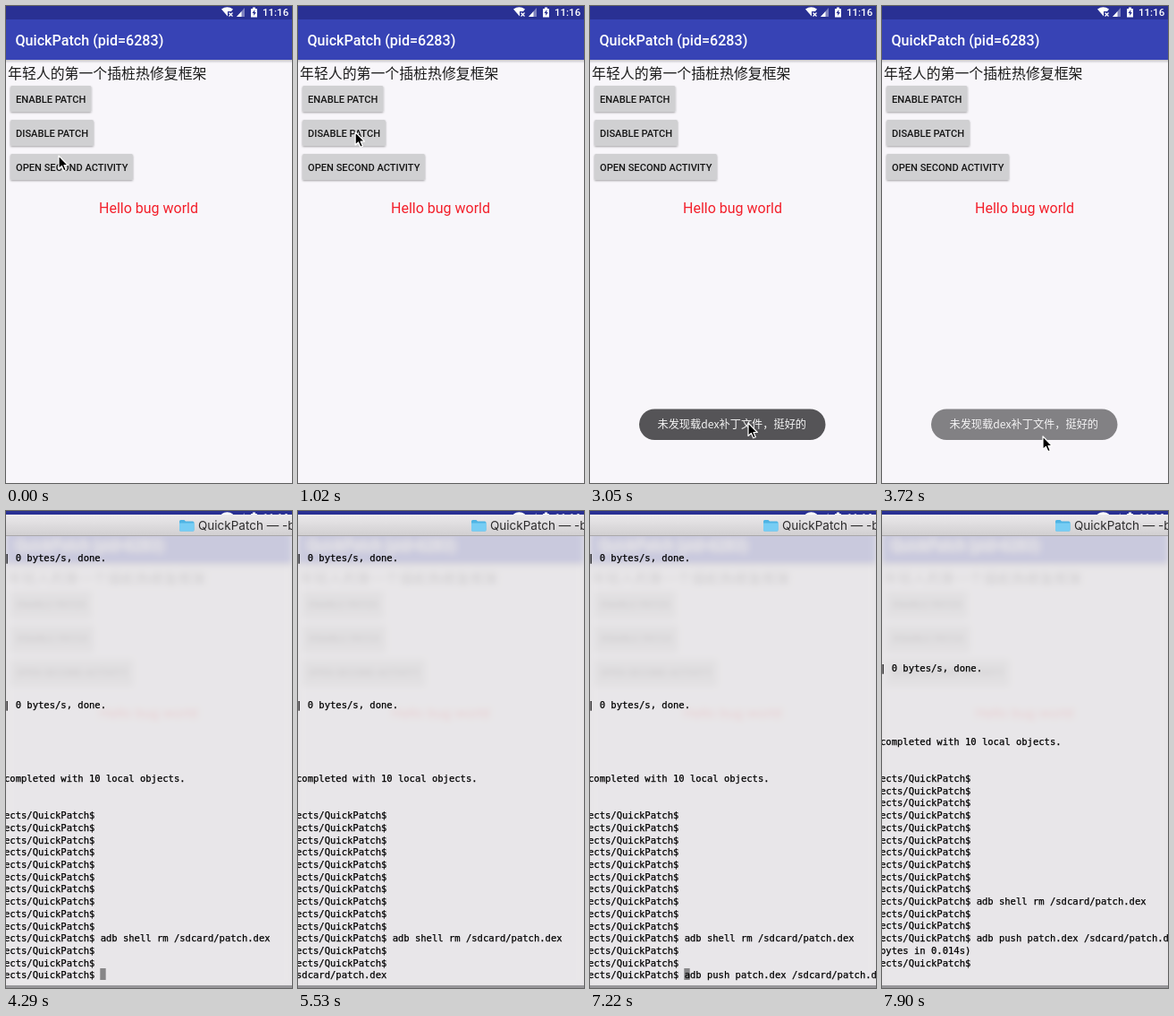
An HTML page for the animation above (8000 ms loop, 320 by 532 pixels).

```html
<!DOCTYPE html>
<html lang="zh-CN">
<head>
<meta charset="utf-8">
<title>QuickPatch</title>
<style>
html, body { margin: 0; width: 100%; height: 100%; overflow: hidden; background: #f8f6fa; }
svg { display: block; width: 320px; height: 532px; }
text { white-space: pre; }
.ui { font-family: Roboto, "Noto Sans", sans-serif; }
.cjk { font-family: "Noto Sans CJK SC", "Noto Sans CJK", sans-serif; }
.label { font-size: 11.1px; font-weight: 500; fill: #151515; }
.term { font: 10.53px "DejaVu Sans Mono", monospace; fill: #000; }
.term text { stroke: #000; stroke-width: .25px; }
</style>
</head>
<body>
<svg viewBox="0 0 320 532">
  <defs>
    <filter id="blur"><feGaussianBlur stdDeviation="3.7"/></filter>
    <filter id="shade" x="-10%" y="-20%" width="120%" height="150%">
      <feDropShadow dx="0" dy="1" stdDeviation=".8" flood-opacity=".35"/>
    </filter>
    <linearGradient id="bar" x2="0" y2="1">
      <stop stop-color="#ebe9eb"/><stop offset="1" stop-color="#d0ced0"/>
    </linearGradient>
    <linearGradient id="drop" x2="0" y2="1">
      <stop stop-color="#000" stop-opacity=".2"/><stop offset="1" stop-opacity="0"/>
    </linearGradient>
    <clipPath id="pane"><rect y="28" width="320" height="500"/></clipPath>
  </defs>

  <g id="app" class="ui">
    <rect width="320" height="532" fill="#f8f6fa"/>
    <rect y="60" width="320" height="4" fill="url(#drop)"/>
    <rect width="320" height="60" fill="#3743b5"/>
    <rect width="320" height="15" fill="#293093"/>
    <g fill="#fff">
      <path d="M241 3.5Q247.500 -1 254 3.500L252 6H248V11.500Z"/>
      <path d="M249.500 7.500l4 4m0-4l-4 4" stroke="#fff" stroke-width="1.200"/>
      <path d="M258 12L267 2V12Z" opacity=".4"/>
      <path d="M258 12L263.500 6V12Z"/>
      <path d="M274 3h2v-1.500h3V3h2v9.500h-7Z"/>
      <path d="M278.300 4l-2.800 4h1.700v3l2.600-4h-1.500Z" fill="#293093"/>
      <text x="287" y="11.200" font-size="11.500" font-weight="500">11:16</text>
      <text x="10.500" y="44" font-size="16.100" font-weight="500">QuickPatch (pid=6283)</text>
    </g>
    <text class="cjk" x="2" y="80.500" font-size="15.900" fill="#1c1c1c">年轻人的第一个插桩热修复框架</text>
    <g fill="#d0d0d2" filter="url(#shade)">
      <rect id="enable" x="5" y="89" width="90.500" height="29" rx="1.500"/>
      <rect x="5" y="127" width="93" height="29" rx="1.500"/>
      <rect x="5" y="165" width="137" height="29" rx="1.500"/>
    </g>
    <text class="label" x="11" y="108">ENABLE PATCH</text>
    <text class="label" x="11" y="146">DISABLE PATCH</text>
    <text class="label" x="11" y="183.500">OPEN SECOND ACTIVITY</text>
    <text x="159.500" y="231" font-size="16" fill="#f3202b" text-anchor="middle">Hello bug world</text>
    <g id="toast">
      <rect x="55" y="449.500" width="208.500" height="34.500" rx="17.250" fill="#555457"/>
      <text class="cjk" x="75.500" y="471" font-size="12.200" fill="#f4f4f4">未发现载dex补丁文件，挺好的</text>
    </g>
  </g>

  <path id="mouse" d="M0 0V14.500L3.400 11.400L5.700 16.800L8.300 15.700L6 10.500H10.300Z" stroke="#fff" stroke-width="1.200" stroke-linejoin="round"/>

  <g id="terminal">
    <rect y="4" width="320" height="528" fill="#e6e4e6"/>
    <g clip-path="url(#pane)">
      <use href="#app" filter="url(#blur)" opacity=".16"/>
      <rect id="bell" y="28" width="320" height="500" opacity=".1"/>
    </g>
    <g id="lines" class="term">
      <rect id="block" x="105.300" width="6.350" height="13" fill="#868587"/>
    </g>
    <rect y="529" width="320" height="3" fill="#98979a"/>
    <rect y="4" width="320" height="24" fill="url(#bar)"/>
    <rect y="27" width="320" height="1" fill="#a9a7a9"/>
    <path d="M194 11.500q0-1.500 1.500-1.500h4l1.500 1.500h8q1.500 0 1.500 1.500v8q0 1.500-1.500 1.500h-13.500q-1.500 0-1.500-1.500Z" fill="#4fb4e4"/>
    <path d="M194 13.500h16.500v7.500q0 1.500-1.500 1.500h-13.500q-1.500 0-1.500-1.500Z" fill="#77cdf4"/>
    <text x="215" y="21.300" font-family="Inter, Roboto, sans-serif" font-size="13.500" fill="#2c2b2c">QuickPatch — -b</text>
  </g>
</svg>
<script>
const $ = id => document.getElementById(id);
const show = (id, on) => $(id).style.display = on ? '' : 'none';
const LOOP = 8000, ROW = 13.7, LAST = 34, LEFT_COL = 39;
const PROMPT = 'ects/QuickPatch$ ';
const RM = 'adb shell rm /sdcard/patch.dex';
const PUSH = 'adb push patch.dex /sdcard/patch.dex';

function addLine(row, str) {
  const line = document.createElementNS('http://www.w3.org/2000/svg', 'text');
  line.setAttribute('x', -2);
  line.setAttribute('y', 55.5 + row * ROW);
  line.textContent = str;
  return $('lines').appendChild(line);
}

addLine(0, '| 0 bytes/s, done.');
addLine(12, '| 0 bytes/s, done.');
addLine(18, 'completed with 10 local objects.');
for (let row = 21; row < LAST; row++) addLine(row, PROMPT + (row == 31 ? RM : ''));
const input = addLine(LAST, '');
const output = addLine(LAST + 1, 'bytes in 0.014s)');
const next = addLine(LAST + 2, PROMPT);

// time, x, y of the pointer tip
const path = [[0, 59, 167], [700, 62, 160], [1500, 68, 105], [2250, 68, 105],
  [2680, 172, 500], [2950, 177, 465], [3250, 177, 465], [3600, 180, 480], [4000, 180, 480]];
// start times of the successive search strings
const keys = [4800, 5000, 5200, 5400, 5720, 5900, 6030, 6160, 6290];

const clamp = v => Math.max(0, Math.min(1, v));
const ease = v => v * v * (3 - 2 * v);

function pointer(t) {
  const i = Math.max(1, path.findIndex(p => p[0] > t));
  const [t0, x0, y0] = path[i - 1], [t1, x1, y1] = path[i];
  const k = ease(clamp((t - t0) / (t1 - t0)));
  return `translate(${x0 + (x1 - x0) * k} ${y0 + (y1 - y0) * k})`;
}

// Reverse history search, cut at the left edge of the stage
function search(t) {
  const query = 'adb push'.slice(0, keys.filter(k => k <= t).length - 1);
  const match = !query ? '' : query.length < 5 ? RM : PUSH;
  return ("(reverse-i-search)`" + query + "': " + match).slice(LEFT_COL);
}

function draw(t) {
  const open = t >= 3900, searching = t >= 4800 && t < 6430, done = t >= 7400;
  show('terminal', open);
  show('mouse', !open);
  if (!open) $('mouse').setAttribute('transform', pointer(t));
  $('enable').setAttribute('fill', t >= 1900 && t < 2200 ? '#bcbcbe' : '#d0d0d2');
  $('toast').setAttribute('opacity', Math.min(clamp((t - 1990) / 400), clamp((3900 - t) / 250)));
  if (!open) return;

  show('bell', t >= 6500 && t < 6650);
  input.textContent = searching ? search(t) : PROMPT + (t >= 6430 ? PUSH : '');
  output.style.display = next.style.display = done ? '' : 'none';
  const scroll = t >= 7850 ? 3 : done ? 2 : 0;
  $('lines').setAttribute('transform', `translate(0 ${-scroll * ROW})`);
  show('block', !searching && t < 7850);
  $('block').setAttribute('y', 44.2 + (LAST + (done ? 2 : 0)) * ROW);
}

const start = performance.now();
(function tick() {
  draw((performance.now() - start) % LOOP);
  requestAnimationFrame(tick);
})();
</script>
</body>
</html>
```
